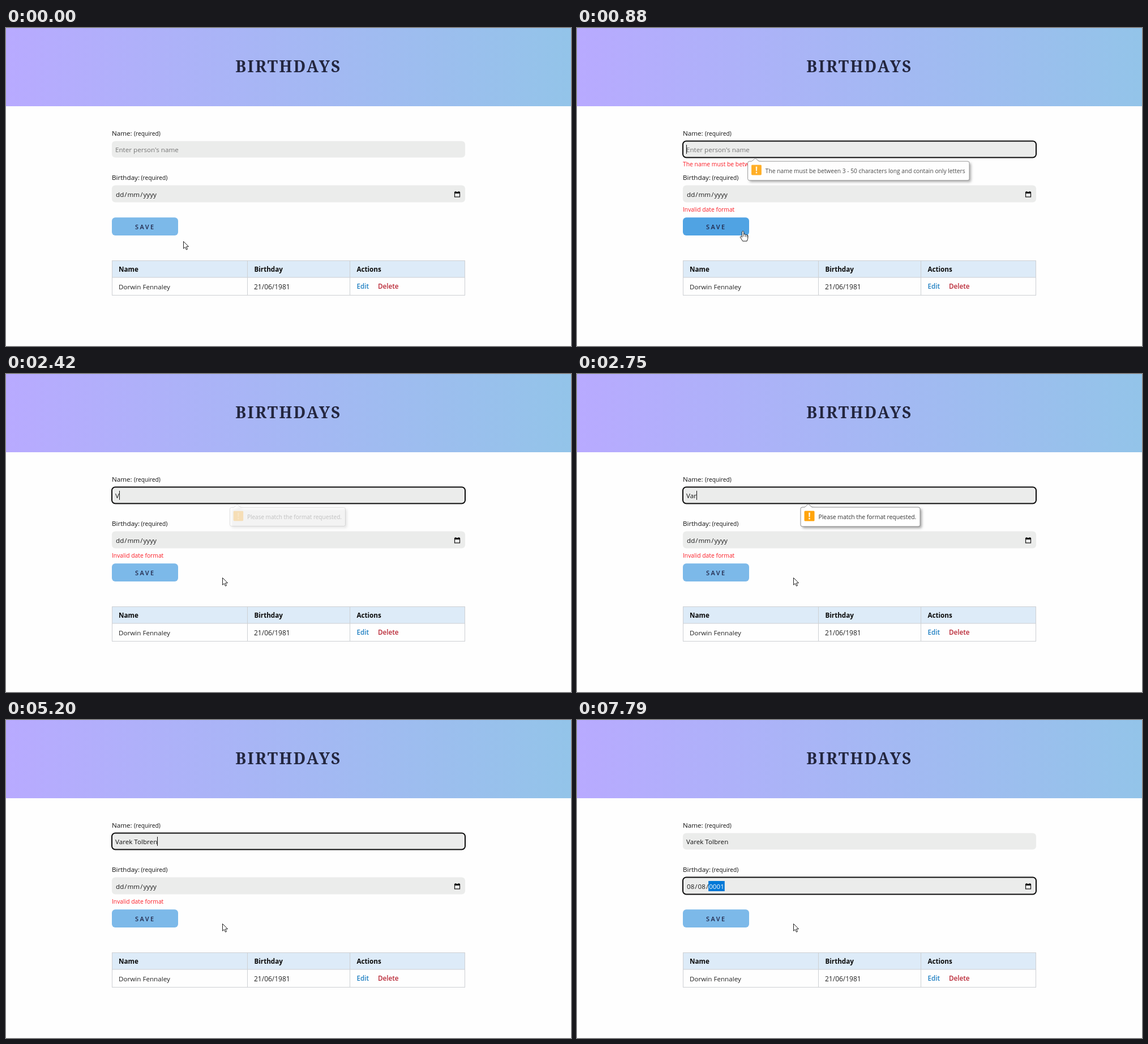
Write an HTML page with a canvas that moves like this. It is 998x561 px and loops after 8000 ms.

```html
<!DOCTYPE html>
<html lang="en">
<head>
<meta charset="utf-8">
<title>Birthdays</title>
<style>
  html, body { margin: 0; width: 100%; height: 100%; overflow: hidden; background: #fefefe; }
  canvas { display: block; }
</style>
</head>
<body>
<canvas id="stage" width="998" height="561"></canvas>
<script>
const ctx = document.getElementById('stage').getContext('2d');
const LOOP = 8000;
const SIZE = 11.65;
const SANS = '"Open Sans", "Noto Sans", sans-serif';
const RED = '#fb1c25';

const TYPED = 'Varek Tolbren';
const KEY_TIMES = [2310, 2540, 2740, 2960, 3180, 3310, 3890, 4170, 4370, 4590, 4790, 5000, 5200];
const CLICK = 610, TAB = 5410, VALID_DATE = 7790;
const NAME_ERROR = 'The name must be between 3 - 50 characters long and contain only letters';

const clamp = v => Math.max(0, Math.min(1, v));
const ramp = (t, from, to) => clamp((t - from) / (to - from));
const ease = p => p * p * (3 - 2 * p);
const mix = (a, b, p) => a + (b - a) * p;

function setFont(size = SIZE, weight = 400, family = SANS) {
  ctx.font = `${weight} ${size}px ${family}`;
}

function text(str, x, y, { size, weight, color = '#111', family, spacing = 0, align = 'left' } = {}) {
  setFont(size, weight, family);
  ctx.letterSpacing = spacing + 'px';
  ctx.textAlign = align;
  ctx.fillStyle = color;
  ctx.fillText(str, x, y);
  const width = ctx.measureText(str).width;
  ctx.letterSpacing = '0px';
  ctx.textAlign = 'left';
  return width;
}

function rect(x, y, w, h, color) {
  ctx.fillStyle = color;
  ctx.fillRect(x, y, w, h);
}

function roundPath(x, y, w, h, r) {
  ctx.beginPath();
  ctx.roundRect(x, y, w, h, r);
}

function polygon(points) {
  ctx.beginPath();
  points.forEach(([x, y]) => ctx.lineTo(x, y));
  ctx.closePath();
}

function paint(fill, stroke, width = 1) {
  ctx.fillStyle = fill;
  ctx.fill();
  if (!stroke) return;
  ctx.strokeStyle = stroke;
  ctx.lineWidth = width;
  ctx.stroke();
}

function header() {
  const g = ctx.createLinearGradient(0, 0, 998, 0);
  g.addColorStop(0, '#b8aaff');
  g.addColorStop(1, '#93c4e9');
  rect(0, 0, 998, 138, g);
  text('BIRTHDAYS', 499, 78, {
    size: 28, weight: 700, color: '#23263f', spacing: 2.4, align: 'center',
    family: '"Noto Serif", serif'
  });
}

function label(name, requiredX, y) {
  text(name, 187, y);
  text('(required)', requiredX, y, { size: 10.2 });
}

function field(y, h, focused) {
  roundPath(187, y, 624, h, 6);
  if (focused) paint('#ebeceb', '#0c0c0c', 2);
  else paint('#ebeceb');
}

function nameField(t) {
  label('Name:', 226, 190);
  field(199.5, 29, t >= CLICK && t < TAB);
  const count = KEY_TIMES.filter(k => t >= k).length;
  const width = count
    ? text(TYPED.slice(0, count), 193, 219)
    : (text("Enter person's name", 193, 219, { color: '#757575' }), 0);
  const blinkOn = t >= CLICK && Math.floor((t - CLICK) / 500) % 2 === 0;
  if (t < TAB && (count ? true : blinkOn)) rect(Math.round(193 + width), 206, 1, 16, '#111');
  if (t >= CLICK && t < KEY_TIMES[0]) text(NAME_ERROR, 187, 243.5, { size: 10.35, color: RED });
}

function calendarIcon() {
  ctx.strokeStyle = '#111';
  ctx.lineWidth = 1.2;
  ctx.strokeRect(792.5, 289.5, 9, 8.5);
  rect(792, 289, 10, 3, '#111');
  rect(793.5, 288, 1.5, 2, '#111');
  rect(799, 288, 1.5, 2, '#111');
}

function dateField(t) {
  label('Birthday:', 238.5, 268);
  field(277.5, 30, t >= TAB);
  const parts = [
    t < 6250 ? 'dd' : t < 6600 ? '00' : '08',
    t < 6950 ? 'mm' : t < 7310 ? '00' : '08',
    t < VALID_DATE ? 'yyyy' : '0001'
  ];
  const active = t < TAB ? -1 : t < 6600 ? 0 : t < 7310 ? 1 : 2;
  let x = 193;
  parts.forEach((part, i) => {
    setFont();
    const width = ctx.measureText(part).width;
    if (i === active) rect(x, 284, width + 2, 18, '#0078d7');
    text(part, x + 1, 298, { color: i === active ? '#fff' : '#1c1c1c' });
    x += width + 2;
    if (i < 2) x += text('/', x, 298, { color: '#1c1c1c' });
  });
  calendarIcon();
  if (t >= CLICK && t < VALID_DATE) text('Invalid date format', 187, 323.5, { size: 10.3, color: RED });
}

function pointer(t) {
  const into = ease(ramp(t, 30, 560));
  const out = ease(ramp(t, 870, 1330));
  return [mix(mix(313, 293, into), 382, out), mix(mix(376, 358, into), 359, out)];
}

function saveButton(t) {
  const hover = ramp(t, 300, 480) * (1 - ramp(t, 930, 1130));
  const rgb = [[124, 80], [185, 163], [233, 227]].map(([a, b]) => mix(a, b, hover));
  roundPath(187, 334.3, 117, 31.7, 6);
  paint(`rgb(${rgb})`);
  text('SAVE', 228, 355, { size: 11, weight: 600, color: '#22284a', spacing: 2.4 });
}

function table() {
  rect(187, 410, 624, 30, '#ddebf8');
  ctx.strokeStyle = '#cdd0d3';
  ctx.lineWidth = 1;
  ctx.strokeRect(187.5, 410.5, 623, 61);
  rect(187, 439.5, 624, 1, '#cdd0d3');
  [426, 607].forEach(x => rect(x, 410, 1, 62, '#cdd0d3'));
  const bold = { weight: 700, color: '#080808' };
  text('Name', 199, 430, bold);
  text('Birthday', 438.5, 430, bold);
  text('Actions', 619.5, 430, bold);
  text('Dorwin Fennaley', 199, 461, { color: '#222' });
  text('21/06/1981', 438, 461, { size: 12, color: '#222' });
  text('Edit', 619.5, 460, { weight: 600, color: '#2281c3' });
  text('Delete', 657, 460, { weight: 600, color: '#b92735' });
}

function bubble(message, tip, width, grow, alpha) {
  if (alpha <= 0) return;
  const scale = 0.95 + 0.05 * grow;
  ctx.save();
  ctx.globalAlpha = alpha;
  ctx.translate(tip, 252);
  ctx.scale(scale, scale);
  ctx.translate(-13.5, -252);

  ctx.beginPath();
  ctx.moveTo(7, 235);
  ctx.lineTo(13.5, 229.5);
  ctx.lineTo(20, 235);
  ctx.lineTo(width - 3, 235);
  ctx.arcTo(width, 235, width, 269, 3);
  ctx.arcTo(width, 269, 0, 269, 3);
  ctx.arcTo(0, 269, 0, 235, 3);
  ctx.arcTo(0, 235, 7, 235, 3);
  ctx.closePath();
  ctx.save();
  ctx.shadowColor = 'rgba(0,0,0,.35)';
  ctx.shadowBlur = 4;
  ctx.shadowOffsetX = ctx.shadowOffsetY = 3;
  paint('#fff');
  ctx.restore();
  paint('#fff', '#8c8c8c');

  roundPath(6.5, 241.5, 18, 18, 1.5);
  paint('#ffa40a');
  polygon([[14.2, 244.5], [16.8, 244.5], [16.4, 252.5], [14.6, 252.5]]);
  paint('#fff');
  rect(14.3, 254, 2.4, 2.4, '#fff');
  text(message, 31.5, 255.8, { size: 10.35, color: '#333' });
  ctx.restore();
}

function bubbles(t) {
  if (t < KEY_TIMES[0]) {
    const p = ramp(t, 620, 950);
    bubble(NAME_ERROR, 315, 395.5, p, ease(p));
  } else {
    const p = ramp(t, 2310, 2640);
    const fade = ease(ramp(t, 2740, 3010));
    bubble('Please match the format requested.', 408.5, 211, p, ease(p) * (1 - fade));
  }
}

function arrowCursor() {
  polygon([[0, 0], [0, 12.6], [2.9, 10], [5, 14.6], [7, 13.7], [5, 9.3], [9, 9.1]]);
  paint('#fff', '#222');
}

function handCursor() {
  ctx.beginPath();
  ctx.moveTo(-1.5, 11);
  ctx.lineTo(-1.5, 1.5);
  ctx.quadraticCurveTo(0, -1, 1.5, 1.5);
  ctx.lineTo(1.5, 6);
  ctx.quadraticCurveTo(3.3, 4.5, 4.4, 6.6);
  ctx.quadraticCurveTo(6.2, 5.4, 7, 7.5);
  ctx.quadraticCurveTo(9, 6.8, 9, 9);
  ctx.lineTo(8.5, 13.5);
  ctx.lineTo(7, 18);
  ctx.lineTo(-0.5, 18);
  ctx.lineTo(-5, 10.5);
  ctx.quadraticCurveTo(-4, 8, -1.5, 11);
  ctx.closePath();
  paint('#fff', '#222');
  [1.5, 4.4, 7].forEach((x, i) => rect(x - 0.4, 6 + i * 0.6, 0.8, 4, '#222'));
}

function cursor(t) {
  const [x, y] = pointer(t);
  ctx.save();
  ctx.translate(x, y);
  ctx.lineJoin = 'round';
  if (x < 304 && y < 366) handCursor();
  else {
    ctx.translate(0.5, 0.5);
    arrowCursor();
  }
  ctx.restore();
}

function draw(t) {
  rect(0, 0, 998, 561, '#fefefe');
  header();
  nameField(t);
  dateField(t);
  saveButton(t);
  table();
  bubbles(t);
  cursor(t);
}

const start = performance.now();
function tick() {
  draw((performance.now() - start) % LOOP);
  requestAnimationFrame(tick);
}
tick();
</script>
</body>
</html>
```
